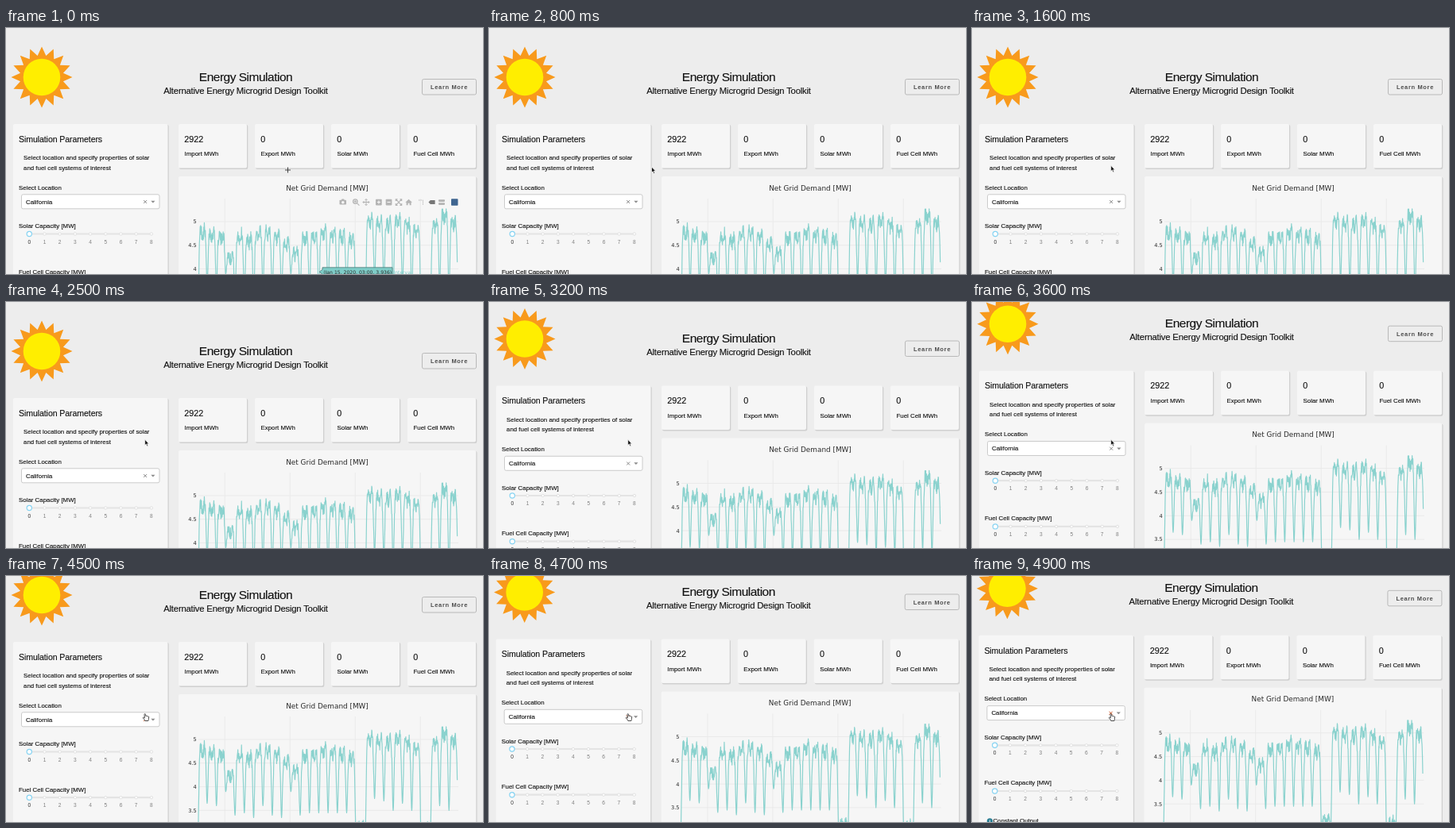
An HTML page that plays this animation: 600 by 310 pixels, repeating every 5 s.

```html
<!DOCTYPE html>
<html lang="en">
<head>
<meta charset="utf-8">
<title>Energy Simulation</title>
<style>
html, body { margin: 0; width: 600px; height: 310px; overflow: hidden; background: #ededed; }
svg { display: block; }
text { font-family: "Liberation Sans", Arial, sans-serif; font-size: 7.88px; fill: #111; stroke: #111; stroke-width: .12px; white-space: pre; }
.plot { font-family: "DejaVu Sans", Verdana, sans-serif; fill: #2a2a2a; stroke: none; }
.soft { stroke: none; }
</style>
</head>
<body>
<svg id="stage" width="600" height="310" viewBox="0 0 600 310">
  <g id="page"></g>
  <g id="pointer"></g>
</svg>
<script>
const NS = 'http://www.w3.org/2000/svg';
const LOOP = 5000;
const page = document.getElementById('page');
const pointer = document.getElementById('pointer');

function add(parent, tag, attrs, content) {
  const el = document.createElementNS(NS, tag);
  for (const k in attrs) el.setAttribute(k, attrs[k]);
  if (content !== undefined) el.textContent = content;
  parent.appendChild(el);
  return el;
}
function label(parent, x, y, str, size, more) {
  const attrs = Object.assign({ x, y }, more);
  if (size) attrs.style = `font-size:${size}px;` + (attrs.style || '');
  return add(parent, 'text', attrs, str);
}
function panel(x, y, width, height) {
  add(page, 'rect', { x: x + 1, y: y + 1, width: width + .3, height: height + .5, rx: 2, fill: '#d0d0d0' });
  add(page, 'rect', { x, y, width, height, rx: 2, fill: '#f6f6f6' });
}
function line(parent, d, stroke, width, more) {
  return add(parent, 'path', Object.assign({ d, stroke, 'stroke-width': width, fill: 'none' }, more));
}

function drawSun(cx, cy) {
  const rays = 16, pts = [];
  for (let i = 0; i < rays * 2; i++) {
    const r = i % 2 ? 27.5 : 38.5, a = i * Math.PI / rays;
    pts.push((cx + r * Math.sin(a)).toFixed(2) + ',' + (cy - r * Math.cos(a)).toFixed(2));
  }
  add(page, 'polygon', { points: pts.join(' '), fill: '#f89a1c' });
  add(page, 'circle', { cx, cy, r: 23.3, fill: '#ffee00' });
}

function drawHeader() {
  const mid = { 'text-anchor': 'middle' };
  label(page, 301.5, 66.5, 'Energy Simulation', 15.5, { ...mid, 'letter-spacing': -.5 });
  label(page, 301.5, 82.6, 'Alternative Energy Microgrid Design Toolkit', 11.3, { ...mid, 'letter-spacing': -.2 });
  add(page, 'rect', { x: 523.5, y: 64.5, width: 68, height: 19.5, rx: 2, fill: 'none', stroke: '#b9b9b9' });
  label(page, 557.5, 77.1, 'Learn More', 7.5, { ...mid, class: 'soft', 'letter-spacing': .65, style: 'font-weight:bold;fill:#4c4c4c' });
}

function drawSlider(y) {
  add(page, 'rect', { x: 27, y: y - 1.1, width: 158, height: 2.2, rx: 1.1, fill: '#e4e4e4' });
  for (let i = 0; i <= 8; i++) {
    const x = 29.3 + i * 19.2;
    add(page, 'circle', { cx: x, cy: y, r: 1.7, fill: '#fff', stroke: '#dedede', 'stroke-width': .9 });
    label(page, x, y + 12, i, 6.6, { 'text-anchor': 'middle', class: 'soft', style: `fill:${i ? '#808080' : '#333'}` });
  }
  add(page, 'circle', { cx: 29.3, cy: y, r: 3.1, fill: '#fff', stroke: '#86d3f2', 'stroke-width': 1.2 });
}

let clearMark;
function drawForm() {
  panel(9, 121, 194.5, 330);
  label(page, 16, 143.8, 'Simulation Parameters', 10.6, { 'letter-spacing': -.1 });
  label(page, 22, 166, 'Select location and specify properties of solar');
  label(page, 22, 178.5, 'and fuel cell systems of interest');
  label(page, 16, 203.6, 'Select Location');
  add(page, 'rect', { x: 19.5, y: 209.8, width: 173.5, height: 18, rx: 2, fill: '#fff', stroke: '#c6c6c6', 'stroke-width': .9 });
  label(page, 25, 221.7, 'California');
  clearMark = line(page, 'M173.2 217l4 4m0-4l-4 4', '#8a8a8a', 1);
  add(page, 'path', { d: 'M182.3 217.7h5.2l-2.6 2.8z', fill: '#8a8a8a' });
  label(page, 16, 252, 'Solar Capacity [MW]');
  drawSlider(259.5);
  label(page, 16, 309.6, 'Fuel Cell Capacity [MW]');
  drawSlider(317.2);
  add(page, 'circle', { cx: 23, cy: 355, r: 3.6, fill: '#2d7f94' });
  label(page, 23, 357.2, 'i', 6, { 'text-anchor': 'middle', class: 'soft', style: 'fill:#fff;font-weight:bold' });
  label(page, 27, 357.3, 'Constant Output');
}

function drawCards() {
  const names = ['Import', 'Export', 'Solar', 'Fuel Cell'];
  names.forEach((name, i) => {
    const x = 217 + i * 96;
    panel(x, 121, 86, 55.5);
    label(page, x + 7.3, 143.8, i ? '0' : '2922', 10.8);
    label(page, x + 7.5, 161, name + ' MWh');
  });
}

// Daily plateau levels and the night minimum that precedes each day
const TOPS = [4.76, 4.72, 4.66, 4.25, 4.66, 4.58, 4.7, 4.74, 4.62, 4.5, 4.3, 4.62, 4.68, 4.76,
  4.7, 4.66, 4.6, 3.1, 4.98, 4.95, 4.93, 4.97, 4.88, 4.82, 3.05, 4.9, 5.1, 4.95];
const LOWS = [2.9, 3.65, 3.6, 3.9, 3.4, 3.45, 3.35, 3.6, 3.4, 3.35, 3.9, 3.4, 3.45, 3.45,
  3.45, 3.45, 3.45, 3.05, 3.05, 3.75, 3.7, 3.5, 3.65, 3.5, 3, 3.05, 3.6, 3.5, 3.3];
const DAY = 11.7;
const yOf = v => 244 + (5 - v) * 59.6;

function demandPath() {
  let seed = 17;
  const rand = () => (seed = (seed * 16807) % 2147483647) / 2147483647 - .5;
  const bump = (p, c, w) => Math.exp(-(((p - c) / w) ** 2));
  let d = '';
  for (let i = 0; i <= 28 * 36 - 4; i++) {
    const t = i / 36, day = Math.floor(t), p = t - day;
    const level = TOPS[day] + .08 * bump(p, .3, .13) + .11 * bump(p, .72, .1) - .06 * bump(p, .5, .12) + rand() * .27;
    const low = p < .5 ? LOWS[day] : LOWS[day + 1];
    const dip = bump(Math.min(p, 1 - p), 0, .125);
    const v = level + (low - level) * dip;
    d += (i ? 'L' : 'M') + (241.3 + t * DAY).toFixed(2) + ' ' + yOf(v).toFixed(2);
  }
  return d;
}

let modebar, tip;
function drawModebar() {
  modebar = add(page, 'g', {});
  const gray = '#b4b4b4';
  const icon = (d, width = 1.1, color = gray) => line(modebar, d, color, width);
  const block = (x, y, width, height, fill = gray) => add(modebar, 'rect', { x, y, width, height, rx: .8, fill });
  const ring = (cx, cy, r, width) => add(modebar, 'circle', { cx, cy, r, fill: 'none', stroke: gray, 'stroke-width': width });
  block(419.5, 216.8, 8.5, 5.8);
  block(422, 215.6, 3.5, 2);
  add(modebar, 'circle', { cx: 423.8, cy: 219.8, r: 1.8, fill: '#f6f6f6' });
  ring(439.3, 218.5, 2.7, 1.3);
  icon('M441.4 220.7l3 3M437.8 218.5h3M439.3 217v3', 1.1);
  icon('M449 219.5h8M453 215.5v8M450.5 218l-1.5 1.5 1.5 1.5M455.5 218l1.5 1.5-1.5 1.5M451.5 217l1.5-1.5 1.5 1.5M451.5 222l1.5 1.5 1.5-1.5', 1);
  block(465, 215.7, 7.7, 7.7);
  icon('M466.8 219.5h4.2M468.9 217.4v4.2', 1.2, '#f6f6f6');
  block(477.7, 215.7, 7.7, 7.7);
  icon('M479.5 219.5h4.2', 1.2, '#f6f6f6');
  icon('M490.3 218v-2.3h2.3M495.4 215.7h2.3v2.3M497.7 221v2.4h-2.3M492.6 223.4h-2.3v-2.4M491 216.4l6 6.2M497 216.4l-6 6.2');
  add(modebar, 'path', { d: 'M502.3 219.8l4.3-4 4.3 4h-1.3v3.5h-2v-2.5h-2v2.5h-2v-3.5z', fill: gray });
  icon('M519 217h5.5v6', 1, gray).setAttribute('stroke-dasharray', '1.4 1');
  add(modebar, 'path', { d: 'M531.5 219.5l2.3-2.6h5.8v5.2h-5.8z', fill: '#777' });
  block(544, 216.3, 8, 2.6);
  block(544, 220.3, 8, 2.6);
  block(560, 215.3, 8.5, 8.5, '#3f6590');
}

function drawChart() {
  panel(217, 187, 374.3, 330);
  const plot = (x, y, str, size, more) => label(page, x, y, str, size, { class: 'plot', ...more });
  for (let i = 0; i < 4; i++) line(page, `M${275.3 + i * 82} 215V420`, '#e9e9e9', .9);
  ['5', '4.5', '4', '3.5'].forEach((s, i) => {
    const y = yOf(5 - i / 2);
    line(page, `M242 ${y}H569`, '#e9e9e9', .9);
    plot(239.8, y + 2.4, s, 6.6, { 'text-anchor': 'end' });
  });
  plot(404, 204.6, 'Net Grid Demand [MW]', 8.9, { 'text-anchor': 'middle' });
  line(page, demandPath(), '#8ad2ce', 1.2, { 'stroke-linejoin': 'round' });
  drawModebar();
  tip = add(page, 'g', {});
  add(tip, 'path', { d: 'M394 307.4l4-3v-2.6h88v11h-88v-2.5z', fill: '#7fcdc8', stroke: '#3f6b69', 'stroke-width': .7 });
  label(tip, 399.2, 309.8, '(Jan 15, 2020, 03:00, 3.936)', 6.1, { class: 'plot' });
  label(tip, 487.5, 309.6, 'Interval', 6, { class: 'plot', style: 'fill:#7fcdc8' });
}

function drawPointers() {
  const cross = add(pointer, 'g', {});
  line(cross, 'M-3.5 0H3.5M0 -3.5V3.5', '#333', .9);
  const edge = { stroke: '#fff', 'stroke-width': .7, 'stroke-linejoin': 'round' };
  const arrow = add(pointer, 'path', { d: 'M0 0V7.2L1.6 5.8 2.7 8.5 4 7.9 2.9 5.4H5.1Z', fill: '#111', ...edge });
  const hand = add(pointer, 'path', {
    d: 'M-1.2 .8C-1.2 -.3 .4 -.3 .5 .8L1 3.4C1.4 2.6 2.4 2.7 2.6 3.5 3 2.9 3.9 3.1 4 3.9 4.6 3.5 5.2 3.9 5.2 4.6L4.8 8 4.3 10H-.3L-.8 8.6-3 6.1C-3.5 5.2-2.4 4.6-1.7 5.2L-.8 6Z',
    transform: 'translate(.4 .4) scale(.88)',
    fill: '#fff', stroke: '#222', 'stroke-width': .9, 'stroke-linejoin': 'round'
  });
  return { cross, arrow, hand };
}

// Linear interpolation through [time, value] pairs
function track(keys, t) {
  if (t <= keys[0][0]) return keys[0][1];
  for (let i = 1; i < keys.length; i++) {
    const [t1, v1] = keys[i], [t0, v0] = keys[i - 1];
    if (t <= t1) return v0 + (v1 - v0) * (t - t0) / (t1 - t0);
  }
  return keys[keys.length - 1][1];
}
const SCROLL = [[2700, 0], [2900, 2.5], [3100, 10.5], [3200, 15.5], [3400, 26.5], [3500, 31.5], [3600, 34.3], [3700, 35.2],
  [4200, 35.2], [4400, 37], [4500, 38], [4700, 41.5], [4900, 46.2]];
const DRIFT = [[4500, 0], [4900, -.6]];
const CURSOR_X = [[0, 354.5], [100, 349], [200, 338], [300, 338], [500, 290], [700, 225], [900, 184], [1000, 174.7]];
const CURSOR_Y = [[0, 179], [300, 179], [1000, 173.3]];
const FADE = [[0, 1], [400, 0]];

drawSun(45, 62);
drawHeader();
drawForm();
drawCards();
drawChart();
const shapes = drawPointers();

function render(time) {
  const t = Math.floor((time % LOOP) / 100) * 100;
  page.setAttribute('transform', `translate(${track(DRIFT, t)} ${-track(SCROLL, t)})`);
  pointer.setAttribute('transform', `translate(${track(CURSOR_X, t)} ${track(CURSOR_Y, t)})`);
  modebar.setAttribute('opacity', track(FADE, t));
  tip.setAttribute('visibility', t < 100 ? 'visible' : 'hidden');
  clearMark.setAttribute('stroke', t < 3900 ? '#8a8a8a' : '#c9501e');
  const active = t < 100 ? 'cross' : t < 3900 ? 'arrow' : 'hand';
  for (const k in shapes) shapes[k].setAttribute('visibility', k === active ? 'visible' : 'hidden');
}

const start = performance.now();
function tick() {
  render(performance.now() - start);
  requestAnimationFrame(tick);
}
tick();
</script>
</body>
</html>
```
